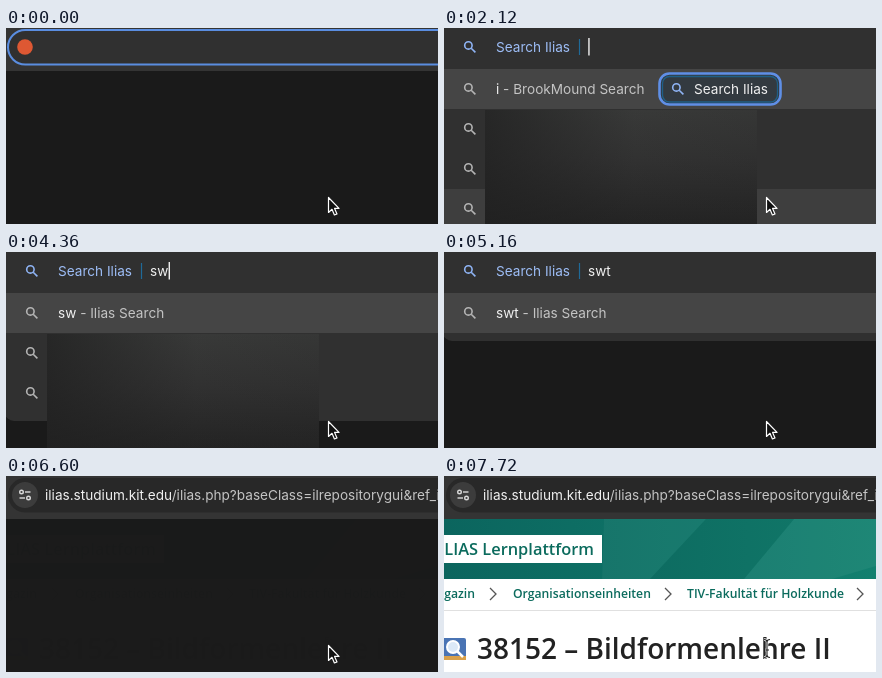
An HTML page for the animation above (7760 ms loop, 432 by 196 pixels).

```html
<!DOCTYPE html>
<html lang="de">
<head>
<meta charset="utf-8">
<title>Address bar search</title>
<style>
html, body { margin: 0; width: 100%; height: 100%; overflow: hidden; background: #1a1a1a; }
svg { display: block; width: 100%; height: 100%; }
text { font: 13.6px Inter, sans-serif; fill: #c4c4c4; white-space: pre; }
.hi { fill: #f0f0f0; }
.tag { fill: #9dbdf6; }
.site text { font: 600 12.2px "Open Sans", sans-serif; fill: #0b6b5d; }
.site .brand { font-size: 16.4px; }
.site .title { font-size: 28px; fill: #222; }
</style>
</head>
<body>
<svg viewBox="0 0 432 196" preserveAspectRatio="xMinYMin meet">
  <defs>
    <g id="lens" fill="none" stroke-width="1.6">
      <circle cx="-1.6" cy="-1.6" r="3.7"/>
      <path d="M1.2 1.2L5.4 5.4"/>
    </g>
    <linearGradient id="veil" x1="0" y1="0" x2="0" y2="1">
      <stop offset="0" stop-color="#3b3c3b"/>
      <stop offset=".45" stop-color="#333"/>
      <stop offset="1" stop-color="#242424"/>
    </linearGradient>
    <linearGradient id="shade">
      <stop offset="0" stop-color="#202020" stop-opacity=".75"/>
      <stop offset=".55" stop-color="#202020" stop-opacity=".1"/>
      <stop offset="1" stop-color="#202020" stop-opacity=".2"/>
    </linearGradient>
    <linearGradient id="teal">
      <stop offset="0" stop-color="#0b655e"/>
      <stop offset="1" stop-color="#12806f"/>
    </linearGradient>
  </defs>

  <rect width="432" height="196" fill="#1a1a1a"/>

  <g id="site" class="site">
    <rect y="43" width="432" height="153" fill="#fff"/>
    <rect y="43" width="432" height="60" fill="url(#teal)"/>
    <path d="M160 43H262L206 103H158Z" fill="#fff" opacity=".04"/>
    <path d="M262 43H350L300 103H206Z" fill="#000" opacity=".05"/>
    <path d="M350 43H432V90L388 103H300Z" fill="#fff" opacity=".05"/>
    <rect x="-2" y="59" width="160" height="28" fill="#fff"/>
    <text class="brand" x="150" y="79" text-anchor="end">ILIAS Lernplattform</text>
    <text x="31" y="122" text-anchor="end">Magazin</text>
    <text x="69" y="122">Organisationseinheiten</text>
    <text x="243" y="122">TIV-Fakultät für Holzkunde</text>
    <path d="M46 112l6 6-6 6M221 112l6 6-6 6M413 112l6 6-6 6" fill="none" stroke="#555" stroke-width="1.3"/>
    <path d="M0 134.5H432" stroke="#e0e0e0"/>
    <rect x="-4" y="162" width="26" height="22" rx="2" fill="#4a74b4"/>
    <rect x="-4" y="180" width="26" height="4" fill="#d9a04a"/>
    <circle cx="9" cy="171" r="6" fill="#dce9f7" stroke="#fff" stroke-width="2"/>
    <path d="M13.500 175.500L19 181" stroke="#fff" stroke-width="2.500"/>
    <text class="title" x="33" y="183">38152 – Bildformenlehre II</text>
    <path d="M320 163.500q3 0 3 2.500q0-2.500 3-2.500M323 166V179M320 181.500q3 0 3-2.500q0 2.500 3 2.500M321 174h4" fill="none" stroke="#fff" stroke-width="2.600"/>
    <path d="M320 163.500q3 0 3 2.500q0-2.500 3-2.500M323 166V179M320 181.500q3 0 3-2.500q0 2.500 3 2.500M321 174h4" fill="none" stroke="#222" stroke-width="1.100"/>
  </g>

  <rect id="toolbar" width="432" height="43" fill="#343434"/>
  <rect id="pill" x="2" y="2" width="470" height="34.500" rx="17.250"/>

  <g id="url">
    <circle cx="19" cy="19" r="13" fill="#3c3c3c"/>
    <g fill="none" stroke="#d8d8d8" stroke-width="1.400">
      <circle cx="15.500" cy="16" r="1.800"/><path d="M19 16h5.500"/>
      <circle cx="22.500" cy="22" r="1.800"/><path d="M13.500 22H19"/>
    </g>
    <text x="39" y="24"><tspan class="hi">ilias.studium.kit.edu</tspan>/ilias.php?baseClass=ilrepositorygui&amp;ref_id</text>
  </g>

  <g id="panel">
    <rect id="sheet" x="-1" y="-20" width="460" rx="9" fill="#303030"/>
    <rect y="41" width="432" height="40" fill="#454545"/>
    <rect id="hover" y="161" width="432" height="40" fill="#3e3e3e"/>
    <g id="icons" stroke="#b4b4b4"></g>
    <text x="52" y="66"><tspan id="query" class="hi"></tspan><tspan id="engine"></tspan></text>
    <g id="chip">
      <rect id="ring" x="215.500" y="45.500" width="121" height="31" rx="10" fill="#333a40" stroke="#5f8fe6" stroke-width="2.600"/>
      <rect x="218.500" y="48.500" width="115" height="25.500" rx="7" fill="none" stroke="#1f5f86" stroke-width="1.300"/>
      <use href="#lens" x="234" y="61" stroke="#8fb4f5"/>
      <text class="hi" x="250" y="66">Search Ilias</text>
    </g>
  </g>

  <g id="cover">
    <rect x="41" y="82" width="272" height="114" fill="#1b1b1b"/>
    <g id="glow">
      <rect x="41" y="82" width="272" height="114" fill="url(#veil)"/>
      <rect x="41" y="82" width="272" height="114" fill="url(#shade)"/>
    </g>
  </g>

  <circle id="mark" cy="19" r="7.800" fill="#de5833"/>
  <g id="scope">
    <use href="#lens" x="26" y="19" stroke="#8fb4f5"/>
    <text class="tag" x="52" y="24">Search Ilias</text>
    <path d="M135.500 11V27" stroke="#1f6a98" stroke-width="1.200"/>
  </g>
  <text id="input" class="hi" y="24"></text>
  <rect id="caret" y="10" width="1.300" height="17.500" fill="#fff"/>
  <path id="arrow" d="M322.500 169.500V184.500L326 181.300L328.400 187L331 185.900L328.600 180.400H333Z" fill="#111" stroke="#fff" stroke-width="1.200" stroke-linejoin="round"/>
</svg>
<script>
const LOOP = 7760;
const el = {};
document.querySelectorAll('[id]').forEach(n => el[n.id] = n);

const show = (node, on) => node.setAttribute('display', on ? 'inline' : 'none');
const set = (node, attrs) => Object.entries(attrs).forEach(([k, v]) => node.setAttribute(k, v));
const within = (t, a, b) => t >= a && t < b;
const ramp = (t, a, b) => Math.min(1, Math.max(0, (t - a) / (b - a)));
const write = (node, s) => { if (node.textContent !== s) node.textContent = s; };

const rowIcons = [0, 1, 2, 3].map(i => {
  const use = document.createElementNS('http://www.w3.org/2000/svg', 'use');
  set(use, { href: '#lens', x: 26, y: 61 + 40 * i });
  return el.icons.appendChild(use);
});

const T = { type: 920, list: 1000, tab: 2120, s: 4320, w: 4360, shrink: 4480, t: 4640, uncover: 5040, enter: 5440, load: 6640, loaded: 7360 };
const caretOn = [[120, 600], [T.type, 1440], [1920, 2600], [3120, 3600], [4120, 5160]];

function typed(t) {
  if (t < T.type) return '';
  if (t < T.tab) return 'i';
  return 'swt'.slice(0, (t >= T.s) + (t >= T.w) + (t >= T.t));
}

function rowCount(t) {
  if (t < T.list || t >= T.shrink) return 1;
  return t < T.w ? 4 : 3;
}

function draw(t) {
  const open = within(t, T.type, T.enter);
  const scoped = within(t, T.tab, T.enter);
  const searching = t >= T.s;
  const done = t >= T.enter;
  const rows = rowCount(t);
  const text = done ? '' : typed(t);

  show(el.toolbar, !open);
  show(el.pill, !open);
  set(el.pill, done ? { fill: '#282828', stroke: 'none' }
                    : { fill: '#303030', stroke: '#5a8de0', 'stroke-width': 2 });
  show(el.url, done);

  show(el.panel, open);
  set(el.sheet, { height: 69 + 40 * rows });
  rowIcons.forEach((icon, i) => show(icon, i < rows));
  show(el.hover, rows === 4);
  write(el.query, searching ? text : 'i');
  write(el.engine, searching ? ' - Ilias Search' : ' - BrookMound Search');
  show(el.chip, !searching);
  show(el.ring, scoped);

  show(el.cover, within(t, T.type, T.uncover));
  const glow = t < T.shrink ? ramp(t, T.list - 40, 1120) : 0;
  set(el.glow, { opacity: glow });

  show(el.mark, t < T.tab);
  set(el.mark, { cx: open ? 26 : 19 });
  show(el.scope, scoped);

  const x = scoped ? 144 : open ? 52 : 39;
  set(el.input, { x });
  write(el.input, text);
  const width = text ? el.input.getComputedTextLength() : 0;
  set(el.caret, { x: x + width + 0.3 });
  show(el.caret, caretOn.some(([a, b]) => within(t, a, b)));

  const fade = 1 - (1 - ramp(t, T.load - 40, T.loaded)) ** 2;
  set(el.site, { opacity: fade });
  set(el.arrow, { opacity: 1 - fade });
}

const start = performance.now();
function tick() {
  draw((performance.now() - start) % LOOP);
  requestAnimationFrame(tick);
}
tick();
</script>
</body>
</html>
```
